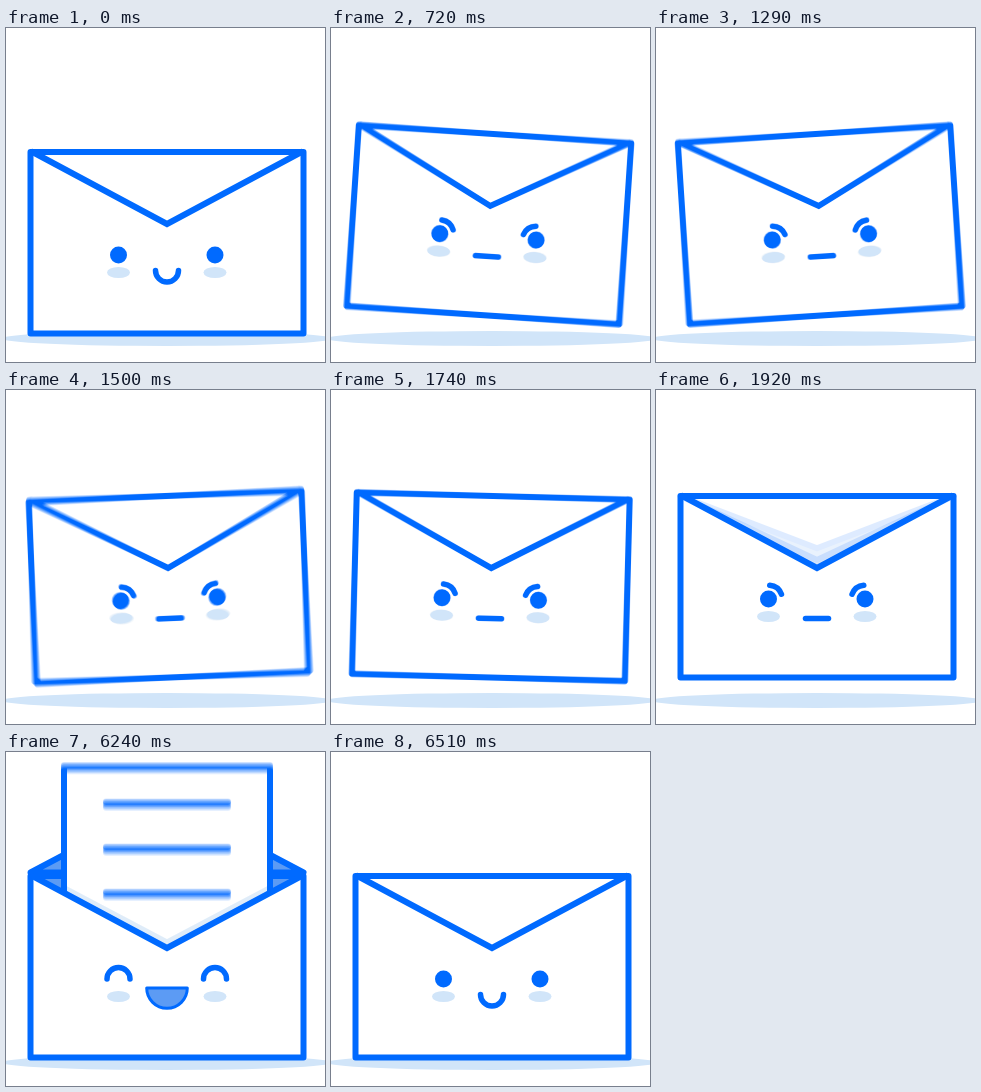
An HTML page with a canvas for the animation above (7.17 s loop, 319x334 px).

```html
<!DOCTYPE html>
<html lang="en">
<head>
<meta charset="utf-8">
<title>Envelope</title>
<style>
  html, body { margin: 0; width: 100%; height: 100%; overflow: hidden; background: #fff; }
  canvas { display: block; width: 319px; height: 334px; }
</style>
</head>
<body>
<canvas id="stage"></canvas>
<script>
const W = 319, H = 334, LOOP = 7170, STEP = 30, SHUTTER = 15, SAMPLES = 8;
const BLUE = '#006aff', INNER = '#5c9bf4', PALE = '#d1e5f9';
const CX = 161, LEFT = 24.5, RIGHT = 297.5, TOP = 124, BOTTOM = 305.5, TIP = 196;
const EYES = [112.5, 209];

const ratio = Math.max(1, window.devicePixelRatio || 1);
const stage = document.getElementById('stage');
const layer = document.createElement('canvas');
for (const c of [stage, layer]) {
  c.width = Math.round(W * ratio);
  c.height = Math.round(H * ratio);
}
const out = stage.getContext('2d');
const g = layer.getContext('2d');

const clamp = x => Math.max(0, Math.min(1, x));
const part = (t, from, to) => clamp((t - from) / (to - from));
const smooth = p => p * p * (3 - 2 * p);
const easeOut = p => 1 - (1 - p) ** 3;

function pose(t) {
  const amp = 4.25 * Math.min(part(t, 530, 720), part(t, 1827, 1624));
  return {
    lift: 18 * (easeOut(part(t, 540, 640)) - smooth(part(t, 1980, 2035))),
    angle: amp * Math.cos(Math.PI * (t - 715) / 85),
    // 1 = flap closed, -1 = fully open
    flap: 1 - 2 * easeOut(part(t, 1930, 1995)) + 2 * smooth(part(t, 6375, 6500)),
    drop: letterDrop(t),
    shade: part(t, 1990, 2050) * (1 - part(t, 6240, 6260)),
    mood: t < 540 || t >= 6390 ? 'calm' : t < 1980 ? 'angry' : 'happy'
  };
}

function letterDrop(t) {
  if (t < 2070) {
    const rise = easeOut(part(t, 1965, 2025));
    return 190 - 204 * rise + 14 * smooth(part(t, 2025, 2065));
  }
  return 190 * part(t, 6240, 6390) ** 1.4;
}

function paint(fill, stroke, width = 6) {
  if (fill) { g.fillStyle = fill; g.fill(); }
  if (stroke) { g.strokeStyle = stroke; g.lineWidth = width; g.stroke(); }
}

function trace(points, close) {
  g.beginPath();
  points.forEach(([x, y]) => g.lineTo(x, y));
  if (close) g.closePath();
}

function ellipse(x, y, rx, ry, color) {
  g.beginPath();
  g.ellipse(x, y, rx, ry, 0, 0, Math.PI * 2);
  paint(color);
}

function arc(x, y, r, from, to, width = 5.5) {
  g.beginPath();
  g.arc(x, y, r, from * Math.PI / 180, to * Math.PI / 180);
  paint(null, BLUE, width);
}

function triangle(base, apex) {
  trace([[LEFT, base], [CX, apex], [RIGHT, base]], true);
}

function drawLetter(drop, shade) {
  g.save();
  trace([[LEFT, -60], [RIGHT, -60], [RIGHT, TOP], [CX, TIP], [LEFT, TOP]], true);
  g.clip();
  const sheet = () => {
    g.beginPath();
    g.rect(58, 13 + drop, 206, 250);
  };
  sheet();
  paint('#fff');
  if (shade > 0) {
    g.save();
    sheet();
    g.clip();
    g.globalAlpha = shade;
    trace([[LEFT, TOP - 5], [CX, TIP - 5], [RIGHT, TOP - 5]]);
    paint(null, PALE, 7);
    g.restore();
  }
  sheet();
  paint(null, BLUE);
  for (let i = 0; i < 3; i++) {
    const y = 49.5 + 45 * i + drop;
    trace([[100, y], [222, y]]);
    paint(null, BLUE);
  }
  g.restore();
}

function drawFace(mood) {
  for (const x of EYES) {
    ellipse(x, 244.5, 11.5, 5.5, PALE);
    if (mood === 'happy') arc(x, 227, 11.5, 180, 360);
    else ellipse(x, 227, 8.5, 8.5, BLUE);
  }
  if (mood === 'calm') {
    arc(CX, 242.5, 11.5, 0, 180);
  } else if (mood === 'angry') {
    arc(EYES[0], 227, 13.8, -85, -20);
    arc(EYES[1], 227, 13.8, -160, -95);
    trace([[149.5, 246.5], [172.5, 246.5]]);
    paint(null, BLUE, 5.5);
  } else {
    g.beginPath();
    g.arc(CX, 236, 20.3, 0, Math.PI);
    g.closePath();
    paint(INNER, BLUE, 3);
  }
}

function draw(t) {
  const p = pose(t);
  const open = p.flap < 0.999;
  g.setTransform(ratio, 0, 0, ratio, 0, 0);
  g.fillStyle = '#fff';
  g.fillRect(0, 0, W, H);
  g.lineCap = g.lineJoin = 'round';
  ellipse(CX, 310.5, 166, 7.5, PALE);

  g.translate(CX, 170 - p.lift);
  g.rotate(p.angle * Math.PI / 180);
  g.translate(-CX, -170);

  if (p.flap < 0) {
    triangle(120.5, 120.5 + 72 * p.flap);
    paint(INNER, BLUE);
  }
  g.beginPath();
  g.rect(LEFT, TOP, RIGHT - LEFT, BOTTOM - TOP);
  paint('#fff');
  if (open) {
    triangle(TOP, TIP);
    paint(INNER);
  }
  g.beginPath();
  g.rect(LEFT, TOP, RIGHT - LEFT, BOTTOM - TOP);
  paint(null, BLUE);
  if (open) drawLetter(p.drop, p.shade);

  g.lineJoin = 'miter';
  trace([[LEFT + 2, TOP], [CX, TIP], [RIGHT - 2, TOP]]);
  paint(null, BLUE);
  g.lineJoin = 'round';
  if (open && p.flap > 0) {
    triangle(TOP, TOP + (TIP - TOP) * p.flap);
    paint('#fff', BLUE);
  }
  drawFace(p.mood);
}

// Average several moments within the shutter for motion blur.
function render(time) {
  const t = Math.floor((time % LOOP) / STEP) * STEP;
  const moving = (t >= 540 && t < 2070) || (t >= 6240 && t < 6510);
  const count = moving ? SAMPLES : 1;
  for (let i = 0; i < count; i++) {
    draw(t + SHUTTER * i / SAMPLES);
    out.globalAlpha = 1 / (i + 1);
    out.drawImage(layer, 0, 0);
  }
}

const start = performance.now();
function tick() {
  render(performance.now() - start);
  requestAnimationFrame(tick);
}
tick();
</script>
</body>
</html>
```
